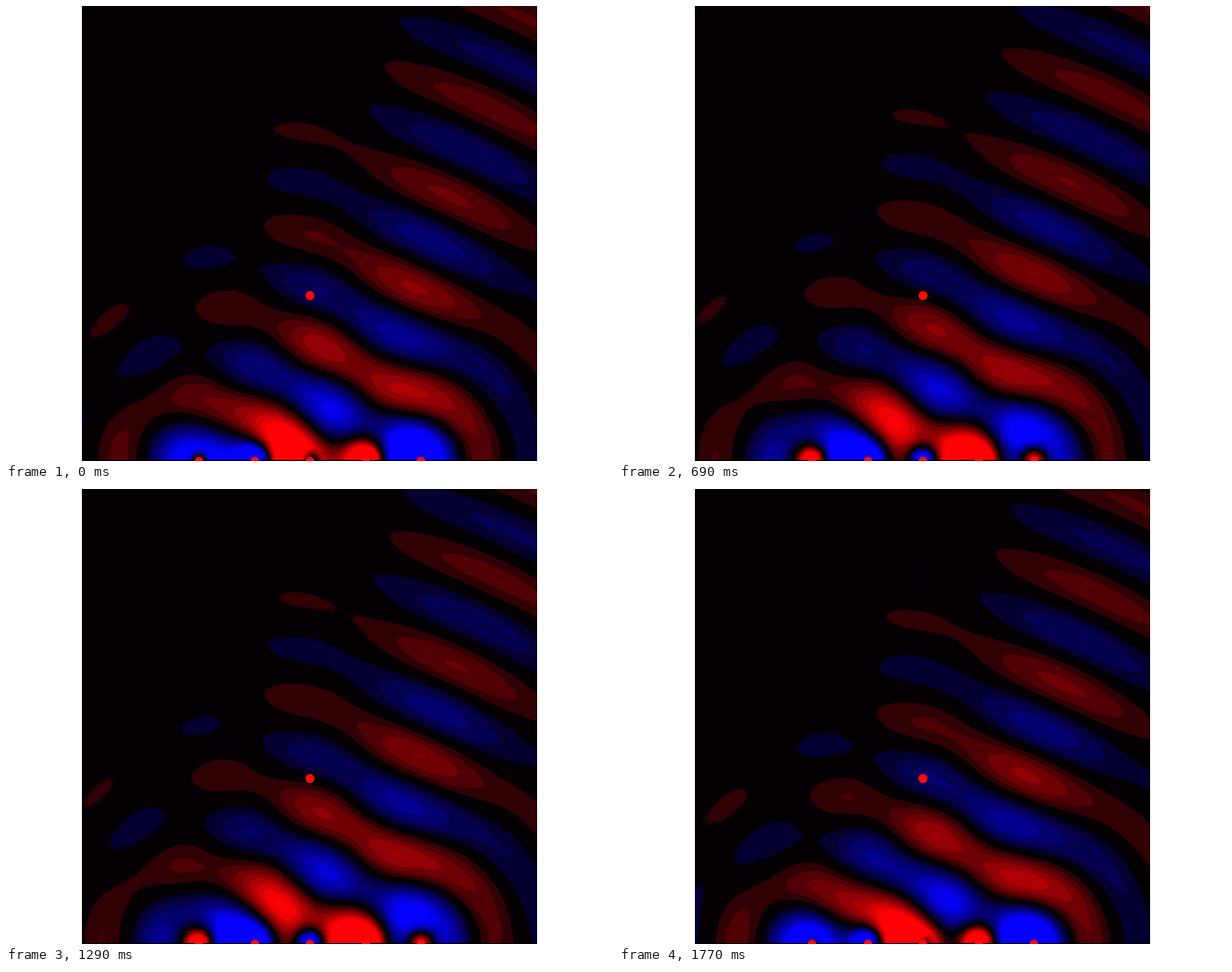
Write an HTML page without scripts that moves like this. It is 640 px wide and 480 px high and loops after 1.8 s.

```html
<!DOCTYPE html>
<html lang="en">
<head>
<meta charset="utf-8">
<title>Phased array</title>
<style>
  /* Distance travelled by the wave; one wavelength is 100px */
  @property --travel {
    syntax: "<length>";
    inherits: true;
    initial-value: 0px;
  }
  @keyframes travel {
    from { --travel: 0px; }
    to { --travel: 100px; }
  }

  html, body {
    margin: 0;
    width: 100%;
    height: 100%;
    overflow: hidden;
    background: #fff;
  }
  .field {
    position: absolute;
    left: 80px;
    top: 0;
    width: 480px;
    height: 480px;
    background: #040004;
    animation: travel .6s steps(20) infinite;
  }

  /* Bands share one wave; the weaker the signal, the higher the gain */
  .band {
    position: absolute;
    left: 0;
    width: 100%;
    overflow: hidden;
    --k: calc(224 / var(--levels));
  }
  .far  { top: 0;     height: 210px; --y: 480px; --levels: 5;  filter: url(#levels5); }
  .mid  { top: 210px; height: 140px; --y: 270px; --levels: 8;  filter: url(#levels8); }
  .near { top: 350px; height: 130px; --y: 130px; --levels: 16; filter: url(#levels16); }

  /* One emitter: red is positive, blue negative, darkened to fall off as 1/r */
  .band i {
    position: absolute;
    inset: 0;
    mix-blend-mode: plus-lighter;
    --x: calc(123.5px + 58.5px * var(--n));
    --o: calc(var(--travel) + 100px - 25px * var(--n));
    --s: calc(100px / 24);
    background:
      radial-gradient(circle at var(--x) var(--y),
        rgb(0 0 0 / calc(1 - var(--k) / 14)) 14px,
        rgb(0 0 0 / calc(1 - var(--k) / 18)) 18px,
        rgb(0 0 0 / calc(1 - var(--k) / 23)) 23px,
        rgb(0 0 0 / calc(1 - var(--k) / 30)) 30px,
        rgb(0 0 0 / calc(1 - var(--k) / 38)) 38px,
        rgb(0 0 0 / calc(1 - var(--k) / 48)) 48px,
        rgb(0 0 0 / calc(1 - var(--k) / 60)) 60px,
        rgb(0 0 0 / calc(1 - var(--k) / 76)) 76px,
        rgb(0 0 0 / calc(1 - var(--k) / 96)) 96px,
        rgb(0 0 0 / calc(1 - var(--k) / 120)) 120px,
        rgb(0 0 0 / calc(1 - var(--k) / 150)) 150px,
        rgb(0 0 0 / calc(1 - var(--k) / 190)) 190px,
        rgb(0 0 0 / calc(1 - var(--k) / 240)) 240px,
        rgb(0 0 0 / calc(1 - var(--k) / 300)) 300px,
        rgb(0 0 0 / calc(1 - var(--k) / 380)) 380px,
        rgb(0 0 0 / calc(1 - var(--k) / 480)) 480px,
        rgb(0 0 0 / calc(1 - var(--k) / 600)) 600px),
      repeating-radial-gradient(circle at var(--x) var(--y),
        #000 var(--o),
        #000042 calc(var(--o) + var(--s)),
        #000080 calc(var(--o) + var(--s) * 2),
        #0000b4 calc(var(--o) + var(--s) * 3),
        #0000dd calc(var(--o) + var(--s) * 4),
        #0000f6 calc(var(--o) + var(--s) * 5),
        #0000ff calc(var(--o) + var(--s) * 6),
        #0000f6 calc(var(--o) + var(--s) * 7),
        #0000dd calc(var(--o) + var(--s) * 8),
        #0000b4 calc(var(--o) + var(--s) * 9),
        #000080 calc(var(--o) + var(--s) * 10),
        #000042 calc(var(--o) + var(--s) * 11),
        #000 calc(var(--o) + var(--s) * 12),
        #420000 calc(var(--o) + var(--s) * 13),
        #800000 calc(var(--o) + var(--s) * 14),
        #b40000 calc(var(--o) + var(--s) * 15),
        #dd0000 calc(var(--o) + var(--s) * 16),
        #f60000 calc(var(--o) + var(--s) * 17),
        #ff0000 calc(var(--o) + var(--s) * 18),
        #f60000 calc(var(--o) + var(--s) * 19),
        #dd0000 calc(var(--o) + var(--s) * 20),
        #b40000 calc(var(--o) + var(--s) * 21),
        #800000 calc(var(--o) + var(--s) * 22),
        #420000 calc(var(--o) + var(--s) * 23),
        #000 calc(var(--o) + var(--s) * 24));
  }
  .band i:nth-child(1) { --n: 0; }
  .band i:nth-child(2) { --n: 1; }
  .band i:nth-child(3) { --n: 2; }
  .band i:nth-child(4) { --n: 3; }
  .band i:nth-child(5) { --n: 4; }

  svg {
    position: absolute;
    left: 0;
    top: 0;
  }
</style>
</head>
<body>
<div class="field">
  <div class="band far"><i></i><i></i><i></i><i></i><i></i></div>
  <div class="band mid"><i></i><i></i><i></i><i></i><i></i></div>
  <div class="band near"><i></i><i></i><i></i><i></i><i></i></div>
</div>
<svg width="640" height="480" viewBox="0 0 640 480">
  <defs>
    <!-- Subtract negative from positive, then cut into flat steps -->
    <filter id="levels5" x="0" y="0" width="1" height="1" color-interpolation-filters="sRGB">
      <feColorMatrix values="1 0 -1 0 0  0 0 0 0 0  -1 0 1 0 0  0 0 0 0 1"/>
      <feComponentTransfer>
        <feFuncR type="discrete" tableValues=".016 .188 .314 .439 .565"/>
        <feFuncB type="discrete" tableValues=".016 .188 .314 .439 .565"/>
      </feComponentTransfer>
    </filter>
    <filter id="levels8" x="0" y="0" width="1" height="1" color-interpolation-filters="sRGB">
      <feColorMatrix values="1 0 -1 0 0  0 0 0 0 0  -1 0 1 0 0  0 0 0 0 1"/>
      <feComponentTransfer>
        <feFuncR type="discrete" tableValues=".016 .188 .314 .439 .565 .69 .816 .941"/>
        <feFuncB type="discrete" tableValues=".016 .188 .314 .439 .565 .69 .816 .941"/>
      </feComponentTransfer>
    </filter>
    <filter id="levels16" x="0" y="0" width="1" height="1" color-interpolation-filters="sRGB">
      <feColorMatrix values="1 0 -1 0 0  0 0 0 0 0  -1 0 1 0 0  0 0 0 0 1"/>
      <feComponentTransfer>
        <feFuncR type="discrete" tableValues=".016 .188 .314 .439 .565 .69 .816 .941 1 1 1 1 1 1 1 1"/>
        <feFuncB type="discrete" tableValues=".016 .188 .314 .439 .565 .69 .816 .941 1 1 1 1 1 1 1 1"/>
      </feComponentTransfer>
    </filter>
  </defs>
  <path d="M80 479.5H560" stroke="#000"/>
  <g fill="#ff0a0a">
    <circle cx="320.5" cy="305.5" r="4.8"/>
    <circle cx="203.5" cy="480" r="4.5"/>
    <circle cx="262.5" cy="480" r="4.5"/>
    <circle cx="320.5" cy="480" r="4.5"/>
    <circle cx="379.5" cy="480" r="4.5"/>
    <circle cx="437.5" cy="480" r="4.5"/>
  </g>
</svg>
</body>
</html>
```
